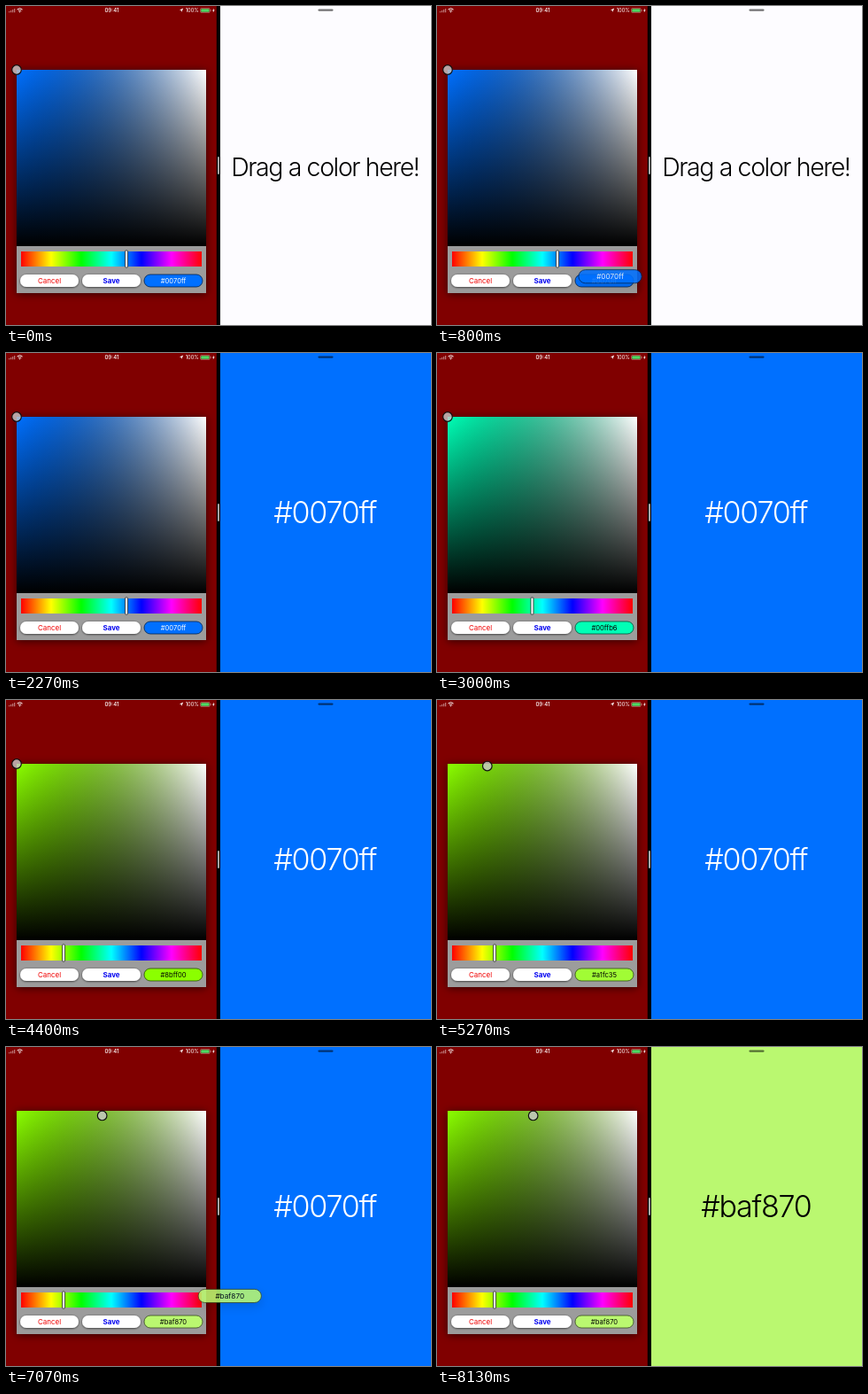
An HTML page for the animation above (8190 ms loop, 480 by 360 pixels).

```html
<!DOCTYPE html>
<html lang="en">
<head>
<meta charset="utf-8">
<title>Color picker drag and drop</title>
<style>
  html, body { margin: 0; width: 100%; height: 100%; overflow: hidden; background: #000; }
  svg { display: block; width: 100vw; height: 100vh; }
  text { font-family: Inter, "Liberation Sans", sans-serif; text-anchor: middle; }
  .status { font-size: 6.2px; font-weight: 500; fill: #fff; }
  .battery { font-size: 5.7px; font-weight: 400; }
  .button { font-size: 8px; }
  .hex { font-size: 7.6px; }
  .big { font-weight: 300; }
</style>
</head>
<body>
<svg viewBox="0 0 480 360">
  <defs>
    <linearGradient id="toWhite">
      <stop offset="0" stop-color="#000" stop-opacity="0"/>
      <stop offset="1" stop-color="#fff"/>
    </linearGradient>
    <linearGradient id="toBlack" x2="0" y2="1">
      <stop offset="0" stop-opacity="0"/>
      <stop offset="1"/>
    </linearGradient>
    <linearGradient id="rainbow">
      <stop offset="0" stop-color="#f00"/>
      <stop offset=".1667" stop-color="#ff0"/>
      <stop offset=".3333" stop-color="#0f0"/>
      <stop offset=".5" stop-color="#0ff"/>
      <stop offset=".6667" stop-color="#00f"/>
      <stop offset=".8333" stop-color="#f0f"/>
      <stop offset="1" stop-color="#f00"/>
    </linearGradient>
    <filter id="cardShadow" x="-20%" y="-20%" width="140%" height="140%">
      <feDropShadow dx="0" dy="1" stdDeviation="5" flood-opacity=".65"/>
    </filter>
    <filter id="pillShadow" x="-20%" y="-40%" width="140%" height="200%">
      <feDropShadow dx="0" dy=".6" stdDeviation=".8" flood-opacity=".75"/>
    </filter>
    <filter id="dragShadow" x="-30%" y="-100%" width="160%" height="350%">
      <feDropShadow dx="0" dy="4" stdDeviation="5" flood-opacity=".14"/>
    </filter>
    <clipPath id="leftApp"><rect width="238" height="360"/></clipPath>
  </defs>

  <g clip-path="url(#leftApp)">
    <rect width="238" height="360" fill="#800000"/>
    <rect x="12" y="72" width="214" height="252" fill="#9c9c9c" filter="url(#cardShadow)"/>
  </g>

  <g fill="#fff">
    <g id="signal" opacity=".45"></g>
    <path d="M12.6 4q3-2.7 6 0M13.9 5.4q1.7-1.4 3.4 0" fill="none" stroke="#fff"/>
    <path d="M14.7 6.4q.9-.7 1.8 0l-.9 1z"/>
    <path d="M200.2 2.5l-4.2 2.1 2 .3.2 2z"/>
    <path d="M235 2.6l-2 2.8h1.2l-.5 2 2-2.8h-1.2z"/>
  </g>
  <text class="status" x="119.5" y="7.2">09:41</text>
  <text class="status battery" x="210.3" y="7">100%</text>
  <rect x="219.5" y="2.5" width="10.8" height="5" rx="1.2" fill="none" stroke="#fff" stroke-opacity=".6" stroke-width=".5"/>
  <rect x="220.2" y="3.2" width="9.4" height="3.6" rx=".6" fill="#4cd964"/>
  <path d="M231.2 4.2v1.6" stroke="#fff" stroke-opacity=".6" stroke-width=".7"/>

  <rect id="field" x="12" y="72" width="214" height="199"/>
  <rect x="12" y="72" width="214" height="199" fill="url(#toWhite)"/>
  <rect x="12" y="72" width="214" height="199" fill="url(#toBlack)"/>
  <circle id="knob" r="5.3" fill="#c8c8c8" fill-opacity=".82" stroke="#111" stroke-width="1.2"/>

  <rect x="17" y="277" width="204" height="17" fill="url(#rainbow)"/>
  <rect id="thumb" y="276" width="3" height="19" rx=".8" fill="#fff" stroke="#222" stroke-width=".8"/>

  <g fill="#fff" filter="url(#pillShadow)">
    <rect x="16" y="303" width="66" height="14" rx="7"/>
    <rect x="86" y="303" width="66" height="14" rx="7"/>
  </g>
  <text class="button" x="49" y="312.9" fill="#f00000">Cancel</text>
  <text class="button" x="119" y="312.9" fill="#0000f0" font-weight="700">Save</text>
  <g id="homePill"></g>

  <rect x="237.8" width="4.4" height="360"/>
  <rect x="239" y="170" width="2" height="20" rx="1" fill="#a4a4a4"/>

  <rect id="target" x="242" width="238" height="360"/>
  <rect x="352.5" y="3.4" width="17" height="2.4" rx="1.2" fill="#000" fill-opacity=".55"/>
  <text id="label" class="big" x="360.3"></text>

  <g id="dragPill" filter="url(#dragShadow)">
    <g id="dragBody" opacity=".87"></g>
    <g id="badge" opacity=".87">
      <circle cx="33.5" cy="-6.8" r="5.7" fill="#35c759" stroke="#fff" stroke-opacity=".5" stroke-width=".5"/>
      <path d="M30.4 -6.8h6.2M33.5 -9.9v6.2" stroke="#fff" stroke-width="1.1"/>
    </g>
  </g>
</svg>
<script>
const LOOP = 8190;
const HOME = { x: 189, y: 310 };
const HUE_START = 240 - 60 * 112 / 255;
const HUE_END = 120 - 60 * 139 / 255;
const DRAGS = [
  { lift: 350, move: 700, arrive: 1450, drop: 1590, to: { x: 321.5, y: 213.4 } },
  { lift: 6400, move: 6750, arrive: 7420, drop: 7570, to: { x: 325, y: 248 } }
];
const DROP_TIME = 110;

const $ = id => document.getElementById(id);
const mix = (a, b, u) => a + (b - a) * u;
const set = (el, attrs) => Object.entries(attrs).forEach(([k, v]) => el.setAttribute(k, v));

function ease(t, from, to) {
  const u = Math.min(1, Math.max(0, (t - from) / (to - from)));
  return u * u * (3 - 2 * u);
}

function hsv(h, s, v) {
  const channel = n => {
    const k = (n + h / 60) % 6;
    return Math.round(255 * v * (1 - s * Math.max(0, Math.min(k, 4 - k, 1))));
  };
  return [channel(5), channel(3), channel(1)];
}

const toHex = rgb => '#' + rgb.map(c => c.toString(16).padStart(2, '0')).join('');
const ink = ([r, g, b]) => .299 * r + .587 * g + .114 * b > 135 ? '#000' : '#fff';

function makePill(group) {
  group.innerHTML = '<rect x="-33" y="-7" width="66" height="14" rx="7" stroke-width=".8"/>' +
    '<text class="hex" y="2.8"></text>';
  const [body, text] = group.children;
  return rgb => {
    set(body, { fill: toHex(rgb), stroke: toHex(rgb.map(c => Math.round(c * .3))) });
    text.textContent = toHex(rgb);
    text.setAttribute('fill', ink(rgb));
  };
}

const paintHome = makePill($('homePill'));
const paintDrag = makePill($('dragBody'));
$('homePill').setAttribute('transform', `translate(${HOME.x} ${HOME.y})`);
$('signal').innerHTML = [0, 1, 2, 3].map(i =>
  `<rect x="${3 + i * 2}" y="${6 - i}" width="1.3" height="${1.3 + i}"/>`).join('');

const firstColor = hsv(HUE_START, 1, 1);
const lastColor = hsv(HUE_END, .5484, .9725);

function drawTarget(t) {
  const color = t >= DRAGS[1].drop + 80 ? lastColor : t >= DRAGS[0].drop + 80 ? firstColor : null;
  $('target').setAttribute('fill', color ? toHex(color) : '#fdfcff');
  $('label').textContent = color ? toHex(color) : 'Drag a color here!';
  set($('label'), {
    fill: color ? ink(color) : '#000',
    y: color ? 192.3 : 191.7,
    'font-size': color ? 34 : 28.5,
    'letter-spacing': color ? -1.25 : -1.4
  });
}

function drawDrag(t, color) {
  const drag = DRAGS.find(d => t >= d.lift && t < d.drop + DROP_TIME);
  $('dragPill').style.display = drag ? '' : 'none';
  if (!drag) return;
  const u = ease(t, drag.move, drag.arrive);
  const fall = ease(t, drag.drop, drag.drop + DROP_TIME);
  const x = mix(HOME.x, drag.to.x, u);
  const y = mix(HOME.y, drag.to.y, u);
  const scale = mix(1, 1.08, ease(t, drag.lift, drag.lift + 250)) * (1 - .6 * fall);
  set($('dragPill'), { transform: `translate(${x} ${y}) scale(${scale})`, opacity: 1 - fall });
  $('badge').style.display = x > 270 ? '' : 'none';
  paintDrag(color);
}

function draw(t) {
  const hue = mix(HUE_START, HUE_END, ease(t, 2262, 3962));
  const slide = ease(t, 4700, 5900);
  const s = mix(1, .5484, slide);
  const v = mix(1, .9725, slide);
  const color = hsv(hue, s, v);
  $('field').setAttribute('fill', toHex(hsv(hue, 1, 1)));
  set($('knob'), { cx: 12 + 214 * (1 - s), cy: 72 + 199 * (1 - v) });
  $('thumb').setAttribute('x', 14.5 + hue * .562);
  paintHome(color);
  drawTarget(t);
  drawDrag(t, color);
}

const start = performance.now();
function tick() {
  draw((performance.now() - start) % LOOP);
  requestAnimationFrame(tick);
}
tick();
</script>
</body>
</html>
```
